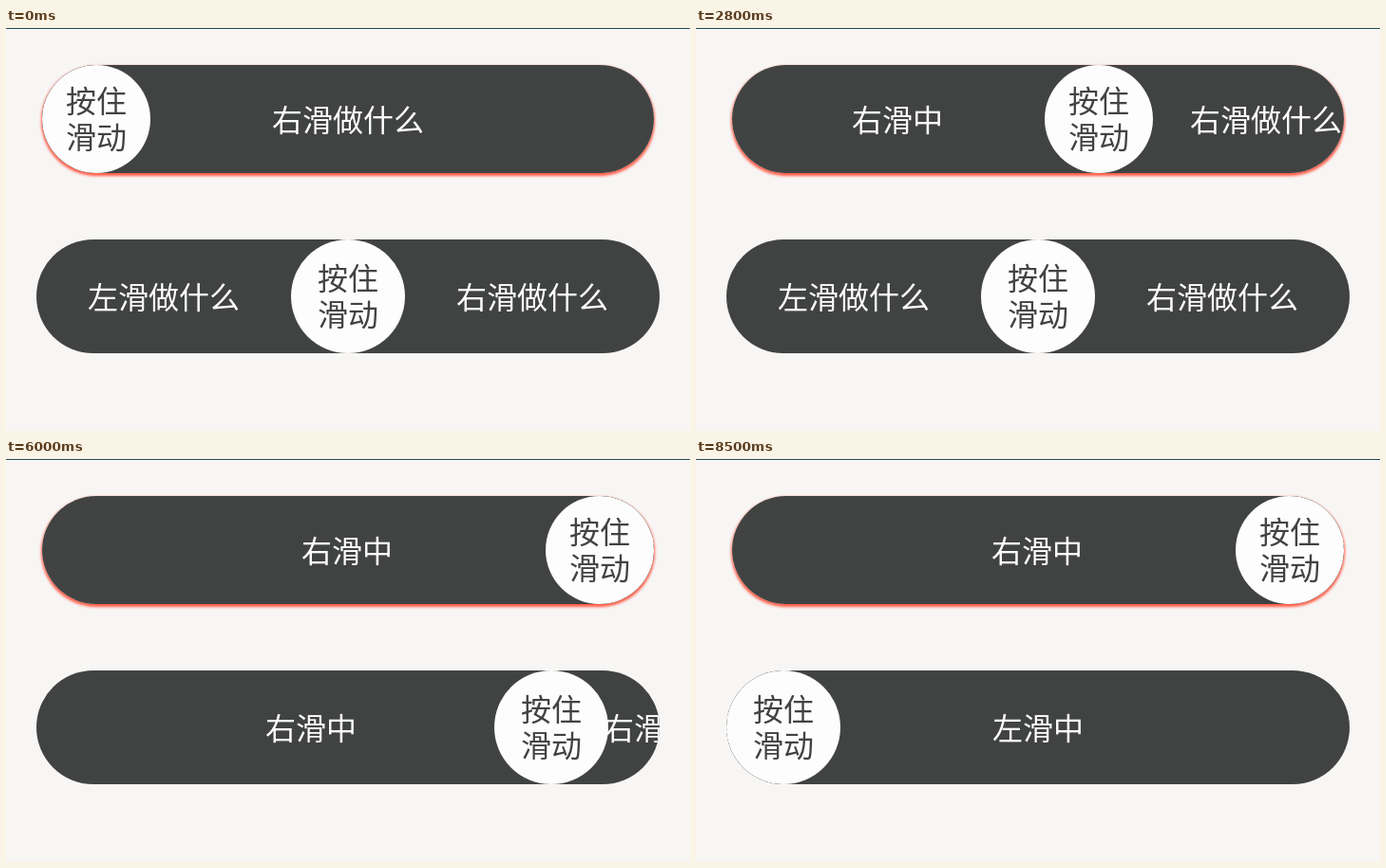
Recreate the animation shown at these times as an HTML page. Size 720x425 px, loop 10000 ms.

```html
<!DOCTYPE html>
<html lang="zh-CN">
<head>
<meta charset="utf-8">
<title>Slide buttons</title>
<style>
  html, body { margin: 0; width: 100%; height: 100%; overflow: hidden; }
  body {
    position: relative; box-sizing: border-box;
    background: #f8f6f5; border-top: 1px solid #1d4a54;
    font: 32px "Noto Sans CJK SC", "Noto Sans CJK", sans-serif;
  }
  .slider, .bar { position: absolute; height: var(--h); border-radius: 60px; }
  .slider { left: var(--x); top: var(--y); width: var(--w); }
  .bar { width: 100%; overflow: hidden; background: #414342; }
  #top { --x: 38px; --y: 38px; --w: 644px; --h: 114px; box-shadow: 0 2px 3px 1px #ff5c47; }
  #bottom { --x: 32px; --y: 222px; --w: 656px; --h: 120px; }
  .label, .knob { position: absolute; left: 0; white-space: nowrap; text-align: center; }
  .label { top: -1px; width: 200px; margin-left: -100px; line-height: var(--h); color: #fff; }
  .knob { top: 0; width: var(--h); height: var(--h); border-radius: 50%; background: #fdfdfd; color: #414342; }
  .knob span { position: absolute; left: 0; width: 100%; top: calc(50% - 40px); line-height: 38px; }
</style>
</head>
<body>
<div class="slider" id="top"></div>
<div class="slider" id="bottom"></div>
<script>
const LOOP = 10000, STEP = 100, EASE_OUT = 1.55;

// 0 before start, 1 after end; powers above 1 slow down towards the end
const ramp = (t, start, end, power = 1) =>
  1 - (1 - Math.min(1, Math.max(0, (t - start) / (end - start)))) ** power;

// Drag out, hold until released, then spring back within 300 ms
const swipe = (t, start, reach, release, power) =>
  ramp(t, start, reach, power) - ramp(t, release, release + 300);

const topOffset = t =>
  164 * swipe(t, 500, 1000, 1000, EASE_OUT) +
  300 * ramp(t, 1600, 2700, EASE_OUT) +
  230 * ramp(t, 2700, 3500);

const bottomOffset = t =>
  -160 * swipe(t, 4500, 5000, 5000) +
  268 * swipe(t, 5600, 6100, 6200) -
  268 * swipe(t, 6700, 7300, 7500, 0.93) -
  268 * ramp(t, 8100, 8500);

function makeSlider(id) {
  const bar = document.getElementById(id).appendChild(document.createElement("div"));
  bar.className = "bar";
  bar.innerHTML = '<div class="label"></div><div class="label"></div>' +
    '<div class="knob"><span>按住<br>滑动</span></div>';
  const [left, right, knob] = bar.children;
  const place = (el, x) => { el.style.transform = `translateX(${x}px)`; };
  return (leftX, leftText, rightX, rightText, knobX) => {
    left.textContent = leftText;
    right.textContent = rightText;
    place(left, Math.round(leftX));
    place(right, Math.round(rightX));
    place(knob, Math.round(knobX));
  };
}

const drawTop = makeSlider("top"), drawBottom = makeSlider("bottom");

function frame() {
  const t = Math.floor(performance.now() % LOOP / STEP) * STEP;
  const a = topOffset(t), b = bottomOffset(t);
  const shiftA = a * 0.73, shiftB = b * 0.724;
  const held = Math.abs(b) >= Math.abs(bottomOffset(t - STEP));
  drawTop(shiftA - 65.5, "右滑中", shiftA + 322, "右滑做什么", a);
  drawBottom(
    shiftB + 134, held && b > 0 ? "右滑中" : "左滑做什么",
    shiftB + 522, held && b < 0 ? "左滑中" : "右滑做什么",
    b + 268);
  requestAnimationFrame(frame);
}
frame();
</script>
</body>
</html>
```
